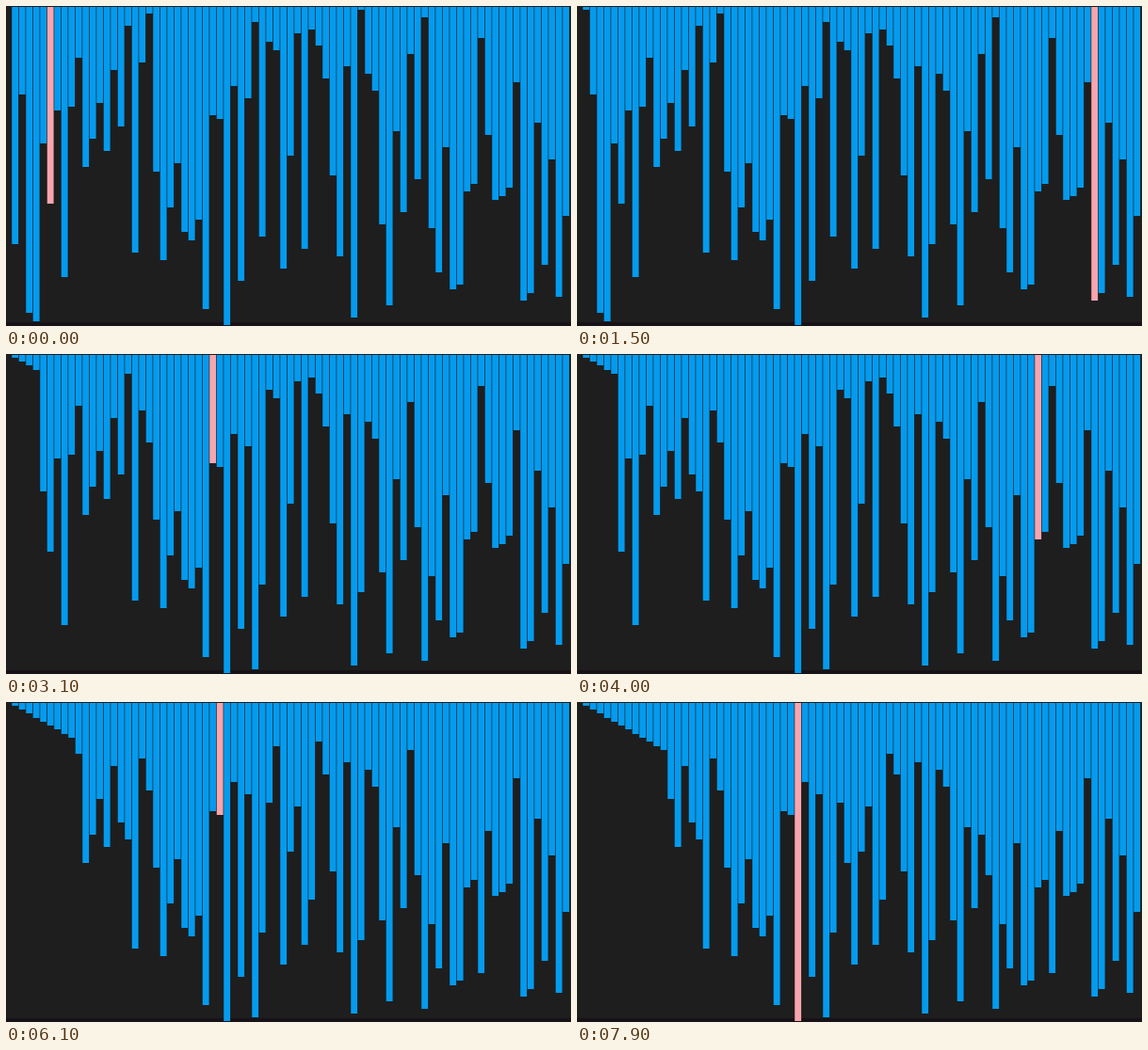
An HTML page with a canvas for the animation above (8 s loop, 600 px wide and 340 px high).

```html
<!DOCTYPE html>
<html lang="en">
<head>
<meta charset="utf-8">
<title>Selection sort</title>
<style>
  html, body { margin: 0; width: 100%; height: 100%; overflow: hidden; background: #1e1e1e; }
  canvas { display: block; width: 600px; height: 340px; }
</style>
</head>
<body>
<canvas id="stage" width="600" height="340"></canvas>
<script>
const ctx = document.getElementById('stage').getContext('2d');
const LOOP = 8000, TICK = 100;
const PITCH = 7.5, LEFT = -1.5, UNIT = 340 / 79;

const start = [
  0, 59, 22, 76, 78, 34, 49, 26, 67, 25, 13, 40, 33, 24, 36, 16, 30, 5, 61, 14,
  2, 41, 63, 50, 39, 56, 58, 53, 75, 27, 28, 79, 20, 68, 23, 4, 57, 9, 11, 65,
  37, 7, 60, 6, 10, 18, 42, 62, 15, 77, 1, 17, 21, 54, 74, 31, 51, 12, 43, 3,
  55, 66, 35, 70, 69, 46, 44, 8, 32, 48, 47, 45, 19, 73, 71, 29, 64, 38, 72, 52
];

// Sorting pace: [tick, comparisons made so far]
const pace = [
  [0, 0], [4, 41], [7, 69], [13, 126], [15, 144], [19, 178], [23, 226],
  [31, 325], [41, 447], [43, 472], [49, 543], [53, 591], [55, 610], [58, 651],
  [59, 663], [61, 681], [65, 729], [67, 750], [71, 795], [77, 863], [79, 883]
];

function stepsAt(tick) {
  const k = pace.findIndex(p => p[0] >= tick);
  if (k < 1) return 0;
  const [t0, s0] = pace[k - 1], [t1, s1] = pace[k];
  return Math.floor(s0 + (s1 - s0) * (tick - t0) / (t1 - t0));
}

// Selection sort, stopped after the given number of comparisons
function sortState(steps) {
  const bars = start.slice();
  let slot = 1, scan = 6;
  while (scan + steps >= bars.length) {
    steps -= bars.length - scan;
    const least = bars.indexOf(Math.min(...bars.slice(slot)));
    [bars[slot], bars[least]] = [bars[least], bars[slot]];
    slot++;
    scan = slot + 1;
  }
  return { bars, scan: scan + steps };
}

function draw(tick) {
  const { bars, scan } = sortState(stepsAt(tick));
  ctx.fillStyle = '#1e1e1e';
  ctx.fillRect(0, 0, 600, 340);
  ctx.fillStyle = '#171217';
  ctx.fillRect(0, 336, 600, 4);
  bars.forEach((value, i) => {
    if (!value) return;
    const x = LEFT + i * PITCH;
    const bottom = Math.round(value * UNIT - 0.7);
    ctx.fillStyle = i === scan ? '#f8a5ae' : '#049bee';
    ctx.fillRect(x + 0.25, 1, PITCH - 0.65, bottom - 1);
  });
}

let shown = -1;
function frame(now) {
  const tick = Math.floor(now % LOOP / TICK);
  if (tick !== shown) draw(shown = tick);
  requestAnimationFrame(frame);
}
draw(0);
requestAnimationFrame(frame);
</script>
</body>
</html>
```
